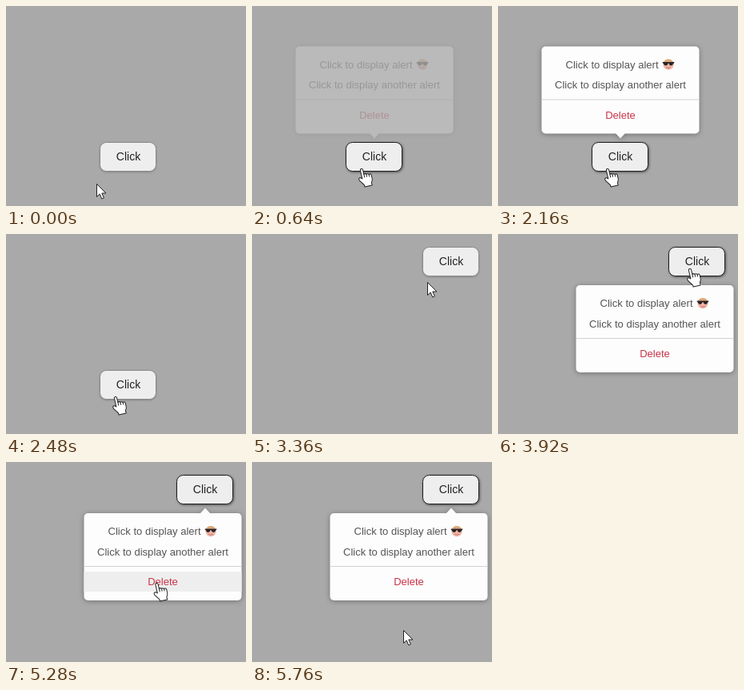
An HTML page that plays this animation: 300x250 px, repeating every 5.84 s.

```html
<!DOCTYPE html>
<html lang="en">
<head>
<meta charset="utf-8">
<title>Popover placement</title>
<style>
  html, body { margin: 0; width: 100%; height: 100%; overflow: hidden; background: #a9a9a9; }
  svg { display: block; width: 100vw; height: 100vh; }
  text { font: 13.05px "Liberation Sans", Arial, sans-serif; fill: #555; }
  .button text { font-size: 14px; fill: #222; }
  .mid { text-anchor: middle; }
  .face { fill: #eeeeef; stroke: #8a8a8a; filter: drop-shadow(0 1px 1px rgba(0, 0, 0, .2)); }
  .focused .face { stroke: #1c1c1c; filter: drop-shadow(1px 1px 1.5px rgba(0, 0, 0, .5)); }
  .sheet { filter: drop-shadow(0 1px 3px rgba(0, 0, 0, .34)); }
  .cursor { fill: #fff; stroke: #222; stroke-linejoin: round; }
</style>
</head>
<body>
<svg viewBox="0 0 300 250" preserveAspectRatio="none">
  <rect width="300" height="250" fill="#a9a9a9"/>

  <g id="button" class="button">
    <rect class="face" x=".5" y=".5" width="70" height="36" rx="8"/>
    <text class="mid" x="36" y="23">Click</text>
  </g>

  <g id="popover">
    <g class="sheet" fill="#fdfdfd">
      <rect width="197" height="109" rx="5"/>
      <path id="tip"/>
    </g>
    <rect id="row" width="197" height="25" fill="#eee"/>
    <path d="M0 66.5H197" stroke="#d2d2d2"/>
    <text x="30" y="27.4">Click to display alert</text>
    <g transform="translate(158.5 22.6)">
      <circle r="6.6" fill="#f0b5a4"/>
      <path d="M-5.8 -3.2A6.6 6.6 0 0 1 5.8 -3.2Z" fill="#dca978"/>
      <path d="M-7.3 -3.2H7.3V-2L6.2 -1Q5.4 1.4 3.3 1.4T.6 -1.4H-.6Q-1 1.4 -3.3 1.4T-6.2 -1L-7.3 -2Z" fill="#2a2226"/>
      <path d="M-2.8 3.6Q0 5.4 2.8 3.6" fill="none" stroke="#c4707a"/>
    </g>
    <text class="mid" x="98.5" y="52.6">Click to display another alert</text>
    <text class="mid" x="98.5" y="90.4" style="fill:#c9344a">Delete</text>
  </g>

  <path id="arrow" class="cursor" d="M.5 .5V16.5L4.2 13L6.8 19L9.4 17.9L6.8 12H12Z"/>
  <g id="hand" class="cursor">
    <g transform="rotate(-13)">
      <path d="M-1.6 13V2Q-1.6 .5 0 .5T1.6 2V8Q3.2 6.8 4.6 8.6Q6.4 7.6 7.6 9.4Q10.5 8.6 10.5 11.5V15.5Q10.5 18 8.6 20V23.5H-.8V21.2L-5.4 14.5Q-6.6 11.8 -4.6 11.2Q-3.2 11 -1.6 13Z"/>
      <path d="M1.6 8V12M4.6 8.6V12M7.6 9.4V12.4" fill="none"/>
    </g>
  </g>
</svg>
<script>
const LOOP = 5840, STEP = 80;
const $ = id => document.getElementById(id);
const clamp = v => Math.max(0, Math.min(1, v));
const place = (el, x, y) => el.setAttribute('transform', `translate(${x} ${y})`);
const show = (el, on) => el.setAttribute('visibility', on ? 'visible' : 'hidden');

const scenes = [
  { button: [117, 170], popover: [54.5, 50.5], open: 600, close: 2480,
    tip: 'M92 108L98.5 115L105 108Z' },
  { button: [213, 16], popover: [97.5, 64], open: 3720, close: LOOP,
    tip: 'M145 .5L151.5 -6.5L158 .5Z' }
];
const rows = [10, 35, 73];

// Cursor hot spot: time, x, y
const path = [
  [0, 113, 222], [160, 124, 213], [240, 129, 209], [400, 136.5, 203],
  [2800, 136.5, 203], [2960, 165, 135], [3120, 188, 92], [3360, 219, 60], [3520, 239.5, 43],
  [4480, 239.5, 43], [4640, 216, 96], [4720, 204.5, 122], [4800, 198, 136],
  [4960, 191, 147], [5120, 188, 151],
  [5360, 188, 151], [5520, 189, 172], [5680, 189, 203], [5760, 189, 210]
];

function cursorAt(t) {
  const i = path.findIndex(p => p[0] > t);
  if (i < 0) return path[path.length - 1].slice(1);
  const [t0, x0, y0] = path[i - 1], [t1, x1, y1] = path[i];
  const k = (t - t0) / (t1 - t0);
  return [x0 + (x1 - x0) * k, y0 + (y1 - y0) * k];
}

const inside = (x, y, [left, top], w, h) =>
  x >= left && x <= left + w && y >= top && y <= top + h;

function render(time) {
  const t = Math.floor(time % LOOP / STEP) * STEP;
  const scene = scenes[t < 2880 ? 0 : 1];
  const [left, top] = scene.popover;
  const opened = t > scene.open && t < scene.close;
  const [x, y] = cursorAt(t);

  place($('button'), ...scene.button);
  $('button').classList.toggle('focused', opened);

  place($('popover'), left, top);
  $('popover').setAttribute('opacity', opened ? clamp((t - scene.open) / 200) : 0);
  $('tip').setAttribute('d', scene.tip);

  const hovered = opened ? rows.find(r => inside(x, y, [left, top + r], 197, 25)) : undefined;
  show($('row'), hovered !== undefined);
  $('row').setAttribute('y', hovered ?? 0);

  const pointing = hovered !== undefined || inside(x, y, scene.button, 71, 37);
  show($('hand'), pointing);
  show($('arrow'), !pointing);
  place($('hand'), x, y);
  place($('arrow'), x, y);
}

const start = performance.now();
function tick() {
  render(performance.now() - start);
  requestAnimationFrame(tick);
}
tick();
</script>
</body>
</html>
```
